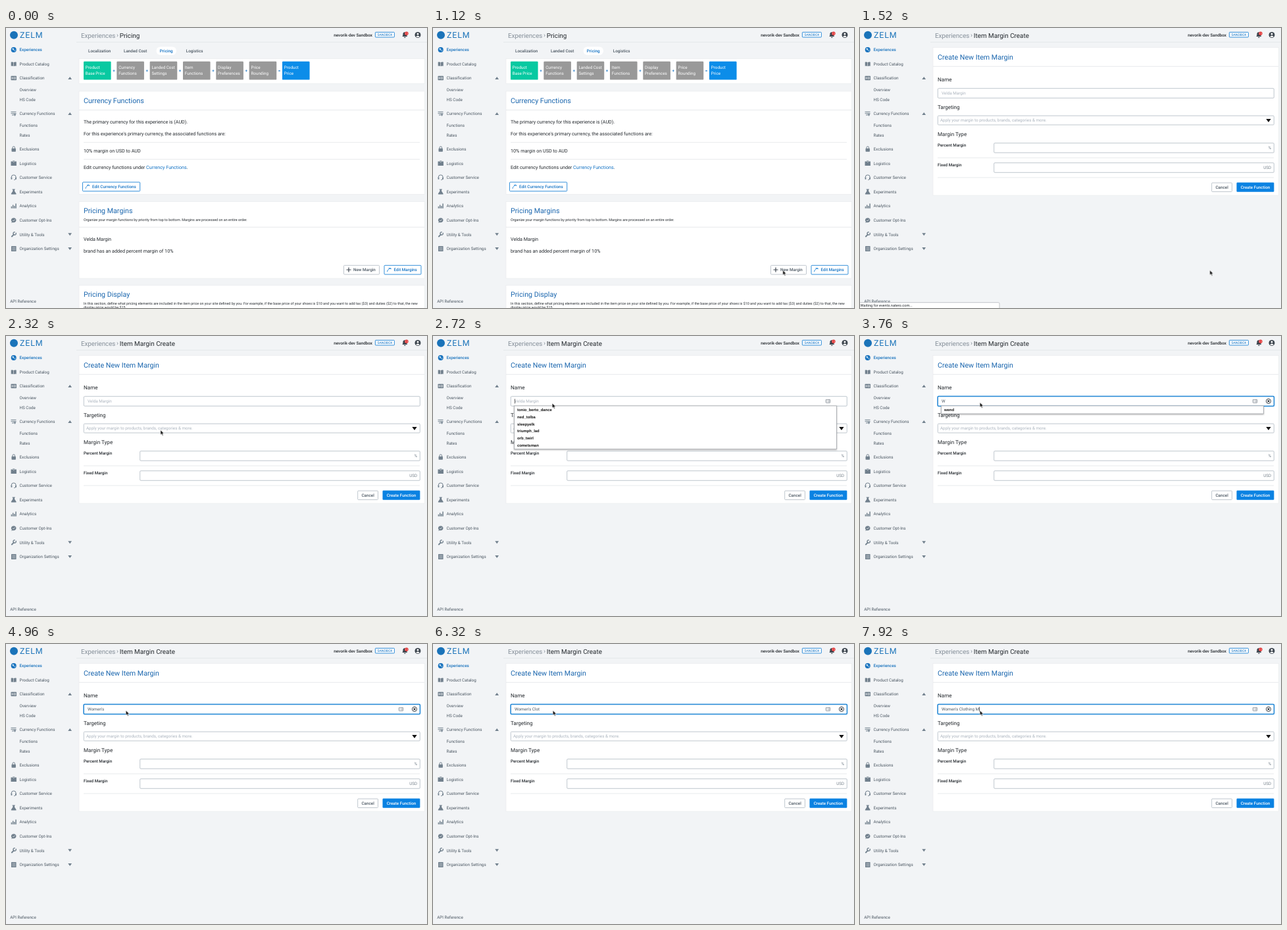
An HTML page for the animation above (8000 ms loop, 640 by 425 pixels).

```html
<!DOCTYPE html>
<html lang="en">
<head>
<meta charset="utf-8">
<title>Item margin form</title>
<style>
html, body { margin: 0; width: 100%; height: 100%; overflow: hidden; background: #f2f4f6; }
svg { display: block; width: 640px; height: 425px; }
text { font: 400 6.3px Roboto, sans-serif; fill: #4c5863; text-rendering: geometricPrecision; white-space: pre; }
.m { font-weight: 500; }
.mid { text-anchor: middle; }
.end { text-anchor: end; }
.crumb { font-size: 9.9px; }
.h { font-size: 10.7px; fill: #1a66ae; }
.body { font-size: 7.2px; fill: #24292e; }
.sub { font-size: 5.4px; fill: #24292e; }
.legend { font-size: 8.1px; fill: #24292e; }
.dark { fill: #24292e; }
.blue { fill: #1272c4; }
.white { fill: #fff; }
.ph { fill: #abb4be; }
.card { fill: #fff; stroke: #e6e9ec; stroke-width: .6; }
.rule { stroke: #e1e5e8; stroke-width: .8; fill: none; }
.box { fill: #fff; stroke: #b9c1c9; stroke-width: .9; }
.out { fill: #fff; stroke: #1f84d6; stroke-width: .9; }
.ico { fill: #71808d; }
.line { fill: none; stroke: #71808d; stroke-width: 1; }
.list text { font: 700 5.9px "Liberation Sans", Arial, sans-serif; fill: #111; }
.list rect { fill: #fff; stroke: #a2a6aa; stroke-width: .8; filter: drop-shadow(0 1.2px 1.2px rgba(0,0,0,.3)); }

.pricing, .form, .status, .recent, .match, .auto, .clear { animation: 8s step-end infinite; }
.pricing { animation-name: pricing; }
.form { animation-name: form; }
.status { animation-name: status; }
.recent { animation-name: recent; }
.match { animation-name: match; }
.auto { animation-name: auto; }
.clear { animation-name: clear; }
.ring { animation: ring 8s linear infinite; }
.pointer { animation: move 8s linear infinite; }
@keyframes pricing { 0% { visibility: visible } 19%, 100% { visibility: hidden } }
@keyframes form { 0% { visibility: hidden } 19%, 100% { visibility: visible } }
@keyframes status { 0% { visibility: hidden } 19% { visibility: visible } 27%, 100% { visibility: hidden } }
@keyframes recent { 0% { opacity: 0 } 34% { opacity: 1 } 42%, 100% { opacity: 0 } }
@keyframes match { 0% { opacity: 0 } 42% { opacity: 1 } 49%, 100% { opacity: 0 } }
@keyframes auto { 0% { opacity: 0 } 34%, 100% { opacity: 1 } }
@keyframes clear { 0% { opacity: 0 } 42%, 100% { opacity: 1 } }
@keyframes ring { 0%, 34% { opacity: 0 } 37%, 100% { opacity: 1 } }
@keyframes move {
  0% { transform: translate(580px, 402px); opacity: 0; animation-timing-function: step-end }
  2% { transform: translate(580px, 402px); opacity: 1; animation-timing-function: ease-out }
  14%, 21% { transform: translate(531.7px, 367.6px); opacity: 1; animation-timing-function: ease-in-out }
  32%, 35% { transform: translate(181.2px, 102px); opacity: 1 }
  38%, 100% { transform: translate(182.2px, 100.8px); opacity: 1 }
}
</style>
</head>
<body>
<svg viewBox="0 0 640 425">
  <defs>
    <path id="up" class="ico" d="M94.3 2 97.2-2 100 2Z"/>
    <path id="down" class="ico" d="M94.3-2 97.2 2 100-2Z"/>
    <path id="pencil" d="M-3 3-2.5.9 1.5-3 3-1.5-1-2.5 3Z M-3 3-2.5.9 1.5-3 3-1.5-.9 2.5Z" fill="none" stroke="#1f84d6" stroke-width=".9" stroke-linejoin="round"/>
  </defs>
  <rect width="640" height="425" fill="#f2f4f6"/>
  <path class="rule" d="M107 21.5H640"/>

  <!-- header -->
  <circle cx="12" cy="10.7" r="6" fill="#1a73b9"/>
  <text x="21" y="15" style="font-size:12.4px;letter-spacing:.9px;fill:#1a73b9">ZELM</text>
  <text class="crumb" x="114" y="14.6" style="fill:#86909a;letter-spacing:-.08px">Experiences</text>
  <text class="crumb" x="168" y="14.4" style="fill:#86909a">›</text>
  <text class="m dark end" x="557" y="12.6">nevorik-dev Sandbox</text>
  <rect class="out" x="561.4" y="6.4" width="29" height="7.6" rx=".8"/>
  <text class="blue mid" x="576" y="12.1" style="font-size:5.1px">SANDBOX</text>
  <path d="M602.3 13c1.2-1.2 1-2.3 1.1-3.8a2.9 2.9 0 0 1 5.8 0c0 1.500 0 2.600 1.100 3.800ZM605 13.700h2.700a1.350 1.350 0 0 1-2.700 0Z" fill="#3e4750"/>
  <circle cx="608.9" cy="8.200" r="2.800" fill="#e23b3b"/>
  <text class="white mid" x="608.9" y="9.600" style="font-size:3.700px">11</text>
  <circle cx="626" cy="10.500" r="4.500" fill="#3e4750"/>
  <circle cx="626" cy="8.900" r="1.500" fill="#fff"/>
  <path d="M623.200 13.200q2.800-3.200 5.600 0-2.800 2-5.600 0Z" fill="#fff"/>

  <!-- sidebar -->
  <circle cx="11.700" cy="33" r="4" fill="#1872bd"/>
  <path d="M9 31.500q2-2 3 0t-1 2.500ZM12.500 34l2-.8-1 2.500Z" fill="#b8d8f0"/>
  <path class="ico" d="M7.700 51.700q2-.8 3.700.4v6q-1.700-1.200-3.700-.4ZM12 52.100q1.700-1.200 3.700-.4v6q-2-.8-3.700.4Z"/>
  <rect class="ico" x="7.500" y="72.800" width="8.500" height="6.400" rx=".8"/>
  <path d="M9 74.500v3M10.800 74.500v3M9 76h1.800M12.600 74.800h2v2.400h-2Z" fill="none" stroke="#f2f4f6" stroke-width=".7"/>
  <path class="line" d="M7.500 127.300h8M7.500 129.700h8M9 132h3"/>
  <path class="ico" d="M11.500 130.500h4l-2 3.500Z"/>
  <rect class="ico" x="8.500" y="182.700" width="6.400" height="5" rx=".7"/>
  <path class="line" d="M9.900 183v-1.400a1.800 1.800 0 0 1 3.600 0v1.400"/>
  <path class="ico" d="M7.500 202.600h2.700l1.500 1.500 1.500-1.500h2.700v6.300H7.500ZM9.800 201.400h3.800l-1.900 1.900Z"/>
  <path class="line" d="M8.200 228v-1.500a3.500 3.500 0 0 1 7 0v1.500q0 2.500-3 2.500"/>
  <path class="ico" d="M7.600 226.700h1.700v3H7.600ZM14.100 226.700h1.700v3h-1.700Z"/>
  <path class="ico" d="M9.600 244.500h4.200v1h-.8v2l2.600 4q.4 1.100-.8 1.100H8.600q-1.200 0-.8-1.100l2.600-4v-2h-.8Z"/>
  <path class="ico" d="M7.700 270.800h1.500v3H7.700ZM9.900 268.500h1.500v5.300H9.900ZM12.100 270h1.500v3.800h-1.500ZM14.300 266.500h1.500v7.300h-1.500Z"/>
  <path class="ico" d="M11.700 288.200a4 3.500 0 1 1-1.500 6.800l-2 .8.700-1.700a4 3.500 0 0 1 2.800-5.900Z"/>
  <path d="M10 291.700l1.300 1.300 2.300-2.500" fill="none" stroke="#f2f4f6" stroke-width=".8"/>
  <path class="line" d="M8.300 317l4.200-4.200" style="stroke-width:1.800"/>
  <path class="line" d="M15 310.800a2.200 2.200 0 1 1-1.400-1" style="stroke-width:1.400"/>
  <rect class="ico" x="8" y="331" width="7.500" height="8" rx=".6"/>
  <path d="M9.500 333h4.500M9.500 335h4.500M9.500 337h4.500" stroke="#f2f4f6" stroke-width=".8" stroke-dasharray="1.100 .6"/>
  <g class="m">
    <text class="m" x="20.500" y="35.200" style="fill:#1872bd">Experiences</text>
    <text x="20.500" y="56.700">Product Catalog</text>
    <text x="20.500" y="78.200">Classification</text>
    <text x="20.500" y="96.100">Overview</text>
    <text x="20.500" y="110.600">HS Code</text>
    <text x="20.500" y="132.200">Currency Functions</text>
    <text x="20.500" y="150.200">Functions</text>
    <text x="20.500" y="164.500">Rates</text>
    <text x="20.500" y="186.100">Exclusions</text>
    <text x="20.500" y="207.600">Logistics</text>
    <text x="20.500" y="229.200">Customer Service</text>
    <text x="20.500" y="250.700">Experiments</text>
    <text x="20.500" y="272.300">Analytics</text>
    <text x="20.500" y="293.900">Customer Opt-Ins</text>
    <text x="20.500" y="315.500">Utility &amp; Tools</text>
    <text x="20.500" y="337.100">Organization Settings</text>
    <text x="6.200" y="417.300">API Reference</text>
  </g>
  <use href="#up" y="76"/><use href="#up" y="130"/>
  <use href="#down" y="313.300"/><use href="#down" y="334.900"/>

  <!-- pricing page -->
  <g class="pricing">
    <text class="crumb dark" x="172.800" y="14.600">Pricing</text>
    <rect x="228.500" y="28.500" width="30.500" height="12.500" rx="6.200" fill="#fff"/>
    <text class="m" x="125" y="36.900">Localization</text>
    <text class="m" x="179" y="36.900">Landed Cost</text>
    <text class="m blue" x="233.800" y="36.900">Pricing</text>
    <text class="m" x="273.800" y="36.900">Logistics</text>
    <rect class="card" x="111" y="46.500" width="525.500" height="38"/>
    <g id="chain"></g>

    <rect class="card" x="111" y="96" width="525.500" height="156.500"/>
    <text class="h" x="118" y="113.800">Currency Functions</text>
    <path class="rule" d="M111 124.500H636M118 173.700H629M118 199.300H629"/>
    <text class="body" x="118" y="145.300">The primary currency for this experience is (AUD).</text>
    <text class="body" x="118" y="163.200">For this experience's primary currency, the associated functions are:</text>
    <text class="body" x="118" y="188.900">10% margin on USD to AUD</text>
    <text class="body" x="118" y="214.300">Edit currency functions under <tspan class="blue">Currency Functions</tspan>.</text>
    <rect class="out" x="116.500" y="234" width="87.200" height="13.700" rx="1"/>
    <use href="#pencil" x="124" y="240.800"/>
    <text class="m blue" x="131" y="243.100">Edit Currency Functions</text>

    <rect class="card" x="111" y="263.500" width="525.500" height="116.500"/>
    <text class="h" x="118" y="281.300">Pricing Margins</text>
    <text class="sub" x="118" y="293.300">Organize your margin functions by priority from top to bottom. Margins are processed on an entire order.</text>
    <path class="rule" d="M111 302.300H636"/>
    <text class="body" x="118" y="322.700">Velda Margin</text>
    <text class="body" x="118" y="340.600">brand has an added percent margin of 10%</text>
    <rect class="box" x="513.500" y="360.300" width="54" height="13.700" rx="1"/>
    <path d="M517.500 367h7M521 363.500v7" stroke="#3e4750" stroke-width="1.200"/>
    <text class="m" x="528" y="369.400">New Margin</text>
    <rect class="out" x="575" y="360.300" width="56" height="13.700" rx="1"/>
    <use href="#pencil" x="582.500" y="367.100"/>
    <text class="m blue" x="589.500" y="369.400">Edit Margins</text>

    <rect class="card" x="111" y="390.500" width="525.500" height="40"/>
    <text class="h" x="118" y="408">Pricing Display</text>
    <text class="sub" x="118" y="419.900">In this section, define what pricing elements are included in the item price on your site defined by you. For example, if the base price of your shoes is $10 and you want to add tax ($3) and duties ($2) to that, the new</text>
    <text class="sub" x="118" y="426">display price would be $15.</text>
  </g>

  <!-- margin form -->
  <g class="form">
    <text class="crumb dark" x="172.800" y="14.600">Item Margin Create</text>
    <rect class="card" x="111" y="29.500" width="525.500" height="224.500"/>
    <text class="h" x="118" y="47.600">Create New Item Margin</text>
    <path class="rule" d="M111 58.300H636M118 197H629M118 227H629"/>
    <text class="legend" x="118" y="80.700">Name</text>
    <text class="legend" x="118" y="122.500" style="letter-spacing:-.05px">Targeting</text>
    <text class="legend" x="118" y="163.900">Margin Type</text>
    <text class="m dark" x="118" y="179.700">Percent Margin</text>
    <text class="m dark" x="118" y="209.800">Fixed Margin</text>
    <rect class="box" x="118.300" y="91.700" width="511" height="14.600" rx="1.300"/>
    <rect class="box" x="118.300" y="133.200" width="511" height="13.800" rx="1.300"/>
    <rect class="box" x="203.700" y="174.700" width="425.600" height="14.600" rx="1.300"/>
    <rect class="box" x="203.700" y="204.700" width="425.600" height="14.600" rx="1.300"/>
    <text class="ph" x="122" y="142.200">Apply your margin to products, brands, categories &amp; more.</text>
    <path d="M617.300 138h7.400l-3.700 5Z" fill="#111"/>
    <text class="end" x="625.200" y="184.100" style="fill:#78838d">%</text>
    <text class="end" x="625.200" y="214.200" style="fill:#78838d">USD</text>
    <rect class="box" x="534.700" y="235" width="30.800" height="13.500" rx="1"/>
    <text class="m mid" x="550.100" y="244">Cancel</text>
    <rect x="572.500" y="234.600" width="56.900" height="14.200" rx="1.200" fill="#0b82e2"/>
    <text class="m mid white" x="601" y="244">Create Function</text>
    <rect class="ring" x="118.100" y="91.500" width="511.400" height="15" rx="1.500" fill="none" stroke="#2389d8" stroke-width="1.500"/>
    <text id="hint" class="ph" x="124" y="101.100">Velda Margin</text>
    <text id="typed" x="124" y="101.100"></text>
    <rect id="caret" y="95.500" width=".7" height="7" fill="#222"/>
    <g class="auto">
      <rect x="597.300" y="96.400" width="6.400" height="5" rx=".6" fill="#fff" stroke="#7c858d" stroke-width=".8"/>
      <path d="M600.700 98h2M600.700 99.700h2M598.400 98.800h1.500" stroke="#7c858d" stroke-width=".8"/>
    </g>
    <g class="clear" fill="none" stroke="#30363c" stroke-width=".9">
      <circle cx="621" cy="98.900" r="3.600"/>
      <path d="M619.500 97.400l3 3m0-3l-3 3" stroke-width="1.100"/>
    </g>
    <g class="recent"><g class="list">
      <rect x="123.600" y="106" width="490" height="65.700"/>
      <text x="128" y="114.200">tonio_berto_dance</text>
      <text x="128" y="124.950">ned_tolba</text>
      <text x="128" y="135.700">sleepyelk</text>
      <text x="128" y="146.450">triumph_lad</text>
      <text x="128" y="157.200">orb_twirl</text>
      <text x="128" y="167.950">cometsman</text>
    </g></g>
    <g class="match"><g class="list">
      <rect x="123.600" y="106" width="490" height="12"/>
      <text x="128" y="114.200">wend</text>
    </g></g>
  </g>

  <g class="status">
    <path d="M-1 416.700H210.500q1.500 0 1.500 1.500V426H-1Z" fill="#fff" stroke="#b4b8bc" stroke-width=".8"/>
    <text class="dark" x=".5" y="423.400" style="font-size:5.600px">Waiting for events.natero.com...</text>
  </g>
  <g class="pointer">
    <path d="M0 0V7.300L1.700 5.800 2.900 8.500 4.200 7.900 3 5.300H5.300Z" fill="#111" stroke="#fff" stroke-width=".6"/>
  </g>
</svg>
<script>
const $ = id => document.getElementById(id);
const steps = ["Product|Base Price", "Currency|Functions", "Landed Cost|Settings", "Item|Functions",
  "Display|Preferences", "Price|Rounding", "Product|Price"];
$("chain").innerHTML = steps.map((s, i) => {
  const x = 118 + i * 50.33, last = i === 6;
  const fill = i === 0 ? "#08c9a1" : last ? "#0c8de9" : "#999";
  const [a, b] = s.split("|");
  const sign = i ? `<text class="m mid blue" x="${x - 4.4}" y="67.3">${last ? "=" : "+"}</text>` : "";
  return `${sign}<rect x="${x}" y="50.8" width="41.6" height="27.8" rx="1.2" fill="${fill}"/>
    <text class="white" x="${x + 2.8}" y="62.1">${a}</text><text class="white" x="${x + 2.8}" y="71.1">${b}</text>`;
}).join("");

// [start in ms, text, caret shown]
const typing = [
  [0, "", 0], [2720, "", 1], [3120, "", 0], [3360, "W", 1], [3760, "W", 0],
  [3920, "Wo", 1], [4160, "Wom", 1], [4320, "Women", 1], [4560, "Women's", 1], [4960, "Women's", 0],
  [5120, "Women's C", 1], [5360, "Women's Clot", 1], [5760, "Women's Clot", 0],
  [6160, "Women's Clot", 1], [6320, "Women's Clot", 0], [6560, "Women's Clothi", 1],
  [6720, "Women's Clothing M", 1], [6960, "Women's Clothing Mar", 1],
  [7120, "Women's Clothing Margin", 1], [7520, "Women's Clothing Margin", 0],
  [7680, "Women's Clothing Mar", 1], [7920, "Women's Clothing M", 1]
];
let start;
function draw(now) {
  start ??= now;
  const t = (now - start) % 8000;
  const [, text, caret] = typing.findLast(k => k[0] <= t);
  $("typed").textContent = text;
  $("hint").style.opacity = text ? 0 : 1;
  $("caret").style.opacity = caret;
  $("caret").setAttribute("x", 124.2 + (text ? $("typed").getComputedTextLength() : 0));
  requestAnimationFrame(draw);
}
requestAnimationFrame(draw);
</script>
</body>
</html>
```
